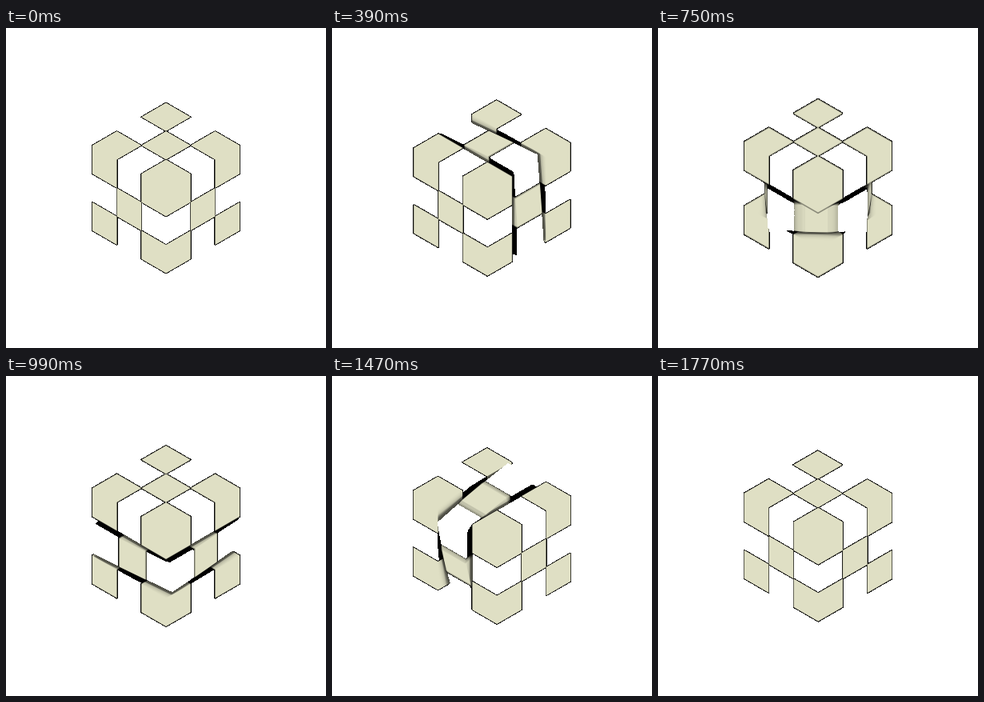
An HTML page with a canvas for the animation above (1800 ms loop, 400 px wide and 400 px high).

```html
<!DOCTYPE html>
<html lang="en">
<head>
<meta charset="utf-8">
<title>Turning checkered cube</title>
<style>
  html, body { margin: 0; width: 100%; height: 100%; overflow: hidden; background: #fff; }
  canvas { display: block; width: 400px; height: 400px; }
</style>
</head>
<body>
<canvas id="stage" width="400" height="400"></canvas>
<script>
const LOOP = 1800, TURN = 600, STEP = 30;
const SAMPLES = 14, SHUTTER = 42, CUTOFF = 0.16;
const BEIGE = '#dfdfc4', INK = '#000';
const GAP = 0.2, REST_GAP = 0.03;
const H = 1.5;
const BOX = [95, 80, 210, 240];

const view = document.getElementById('stage').getContext('2d');
const buffer = document.createElement('canvas');
buffer.width = buffer.height = 400;
const ctx = buffer.getContext('2d', { willReadFrequently: true });
ctx.lineWidth = 1.3;
ctx.lineJoin = 'round';

// Turn angle in degrees over one turn: quick start, long settling
const KEYS = [[0, 0], [.05, 2.5], [.25, 47], [.45, 77.5], [.65, 85], [.8, 88.6], [1, 90]];

function slope(i) {
  if (i === 0 || i === KEYS.length - 1) return 0;
  const [a, b] = [KEYS[i - 1], KEYS[i + 1]];
  return (b[1] - a[1]) / (b[0] - a[0]);
}

function turnAngle(u) {
  let i = 0;
  while (i < KEYS.length - 2 && u > KEYS[i + 1][0]) i++;
  const [x0, y0] = KEYS[i], [x1, y1] = KEYS[i + 1];
  const d = x1 - x0, s = (u - x0) / d, s2 = s * s, s3 = s2 * s;
  return y0 * (2 * s3 - 3 * s2 + 1) + y1 * (3 * s2 - 2 * s3)
    + d * (slope(i) * (s3 - 2 * s2 + s) + slope(i + 1) * (s3 - s2));
}

function spread(u) {
  const s = Math.min(1, Math.min(u, 1 - u) / 0.42);
  return GAP * s * s * (3 - 2 * s);
}

// Axes: 0 faces lower left, 1 faces lower right, 2 faces up
function project(axis, p, q, s, angle) {
  const c = Math.cos(angle), n = Math.sin(angle), v = [];
  v[axis] = p;
  v[(axis + 1) % 3] = q * c - s * n;
  v[(axis + 2) % 3] = q * n + s * c;
  return [200 + (v[1] - v[0]) * 30.7, 200 + (v[0] + v[1]) * 17.75 - v[2] * 35.5];
}

function addPoly(path, points) {
  points.forEach(([x, y], i) => i ? path.lineTo(x, y) : path.moveTo(x, y));
  path.closePath();
}

function square(axis, p, q, s, size, angle) {
  return [[0, 0], [size, 0], [size, size], [0, size]]
    .map(([a, b]) => project(axis, p, q + a, s + b, angle));
}

function join(a, b) {
  const path = new Path2D(a);
  path.addPath(b);
  return path;
}

function erase(path) {
  ctx.globalCompositeOperation = 'destination-out';
  ctx.fill(path);
  ctx.globalCompositeOperation = 'source-over';
}

// The fill hides the inner half of the stroke and the seams between faces
function ink(path) {
  ctx.strokeStyle = INK;
  ctx.stroke(path);
  ctx.fillStyle = BEIGE;
  ctx.fill(path);
}

function shade(region, footprint, alpha) {
  ctx.save();
  ctx.clip(region);
  ctx.globalAlpha = alpha;
  ctx.fillStyle = ctx.shadowColor = INK;
  ctx.shadowBlur = 6;
  ctx.fill(footprint);
  ctx.restore();
}

function drawCube(time) {
  const t = (time + LOOP) % LOOP;
  const axis = [0, 2, 1][Math.floor(t / TURN)];
  const u = (t % TURN) / TURN;
  const gap = spread(u), open = gap > REST_GAP;
  const spin = -turnAngle(u) * Math.PI / 180;
  const angleOf = i => i === 1 ? spin : 0;
  const late = [];

  ctx.clearRect(0, 0, 400, 400);

  for (let i = 0; i < 3; i++) {
    const angle = angleOf(i);
    const low = i - H + (i - 1) * gap, high = low + 1;
    const cap = [new Path2D(), new Path2D()];
    const side = [new Path2D(), new Path2D()];

    for (let j = 0; j < 3; j++)
      for (let k = 0; k < 3; k++)
        addPoly(cap[(i + j + k) % 2], square(axis, high, j - H, k - H, 1, angle));

    for (let m = 0; m < 4; m++) {
      const a = angle + m * Math.PI / 2;
      if (Math.cos(a) + Math.sin(a) < 0.001) continue;
      for (let j = 0; j < 3; j++) {
        const corners = [[low, 0], [high, 0], [high, 1], [low, 1]];
        addPoly(side[(i + j) % 2], corners.map(([p, e]) => project(axis, p, H, j - H + e, a)));
      }
    }

    erase(join(cap[1], side[1]));
    const beige = open || i === 2 ? join(cap[0], side[0]) : side[0];
    if (open) ink(beige);
    else late.push(beige);

    // Shadow of the next layer inside the opening
    if (open && i < 2) {
      const footprint = new Path2D();
      addPoly(footprint, square(axis, high + gap / 2, -H, -H, 3, angleOf(i + 1)));
      shade(cap[1], footprint, 0.95);
      shade(cap[0], footprint, 0.45);
    }
  }
  late.forEach(ink);
}

// Motion blur: mean colour of the painted samples, with a hard edge against the page
function render(time) {
  const moment = Math.floor((time % LOOP) / STEP) * STEP;
  const image = ctx.createImageData(BOX[2], BOX[3]);
  const out = image.data, sum = new Float32Array(out.length);

  for (let n = 0; n < SAMPLES; n++) {
    drawCube(moment + ((n + 0.5) / SAMPLES - 0.5) * SHUTTER);
    const px = ctx.getImageData(...BOX).data;
    for (let i = 0; i < px.length; i += 4) {
      const a = px[i + 3];
      if (!a) continue;
      for (let c = 0; c < 3; c++) sum[i + c] += px[i + c] * a;
      sum[i + 3] += a;
    }
  }

  for (let i = 0; i < out.length; i += 4) {
    const a = sum[i + 3];
    if (a < CUTOFF * SAMPLES * 255) continue;
    for (let c = 0; c < 3; c++) out[i + c] = sum[i + c] / a;
    out[i + 3] = 255;
  }
  view.putImageData(image, BOX[0], BOX[1]);
}

const start = performance.now();
let shown = -1;

function tick() {
  const time = performance.now() - start;
  const step = Math.floor(time / STEP);
  if (step !== shown) {
    shown = step;
    render(time);
  }
  requestAnimationFrame(tick);
}
tick();
</script>
</body>
</html>
```
